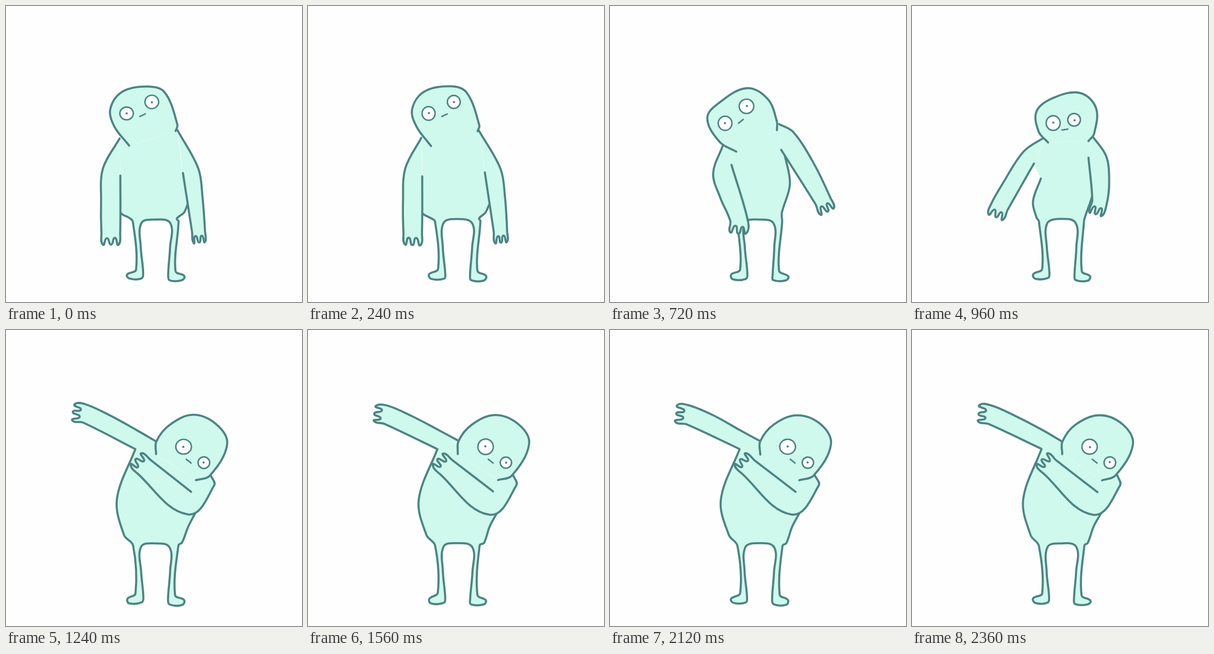
An HTML page with a canvas that plays this animation: 540x540 px, repeating every 2440 ms.

```html
<!DOCTYPE html>
<html lang="en">
<head>
<meta charset="utf-8">
<title>Dab</title>
<style>
html, body { margin: 0; width: 100%; height: 100%; overflow: hidden; background: #fefefe; }
canvas { display: block; width: 100vw; height: 100vh; }
</style>
</head>
<body>
<canvas id="stage" width="540" height="540"></canvas>
<script>
const ctx = document.getElementById('stage').getContext('2d');
const LOOP = 2440, INK = '#4d8482', SKIN = '#cff9ed', PAPER = '#fefefe';

// Arms: neck, shoulder, elbow, wrist centre, armpit, then hand angle and half width.
// Eyes: x, y, radius of each. Everything else is a list of points.
const rest = {
  head: [225,255, 198,220, 190,188, 212,156, 258,147, 289,157, 313,217, 310,228],
  flankL: [207,376, 213,381, 223,386],
  flankR: [312,387, 324,377, 331,363],
  armL: [207,241, 177,297, 173,355, 191,415, 209,310, 90, 16.5],
  armR: [312,227, 351,297, 359,350, 351,411, 322,304, 87, 12],
  eyes: [220,196,12, 266,175,12]
};
const windUp = {
  head: [231,265, 201,249, 178,204, 200,176, 250,150, 288,170, 305,210, 304,227],
  flankL: [235,385, 235,390, 234,395],
  flankR: [314,378, 329,325, 318,270],
  armL: [206,254, 188,305, 201,350, 236,394, 221,290, 95, 16.5],
  armR: [309,216, 335,229, 371,286, 388,356, 312,262, 65, 15],
  eyes: [210,214,12.5, 249,183,13]
};
const peakArm = [309,214, 335,217, 400,271, 430,308, 312,257, 45, 15];
const swing = {
  armL: [246,238, 205,265, 165,325, 160,366, 222,288, 110, 16],
  armR: [328,236, 355,275, 360,325, 342,360, 322,276, 110, 14]
};
const dab = {
  head: [274,227, 274,203, 298,173, 341,155, 384,172, 403,208, 372,266, 346,274],
  flankL: [237,217, 202,309, 216,374],
  flankR: [321,388, 332,358, 346,333],
  armL: [274,203, 238,183, 190,157, 142,155, 236,217, 187, 17],
  armR: [374,265, 380,283, 331,337, 252,250, 338,295, 224, 17],
  eyes: [324,213,14, 361,242,10.5]
};
const keys = [
  [0, rest], [560, rest], [720, windUp], [800, { ...windUp, armR: peakArm }],
  [960, swing], [1160, dab], [LOOP, dab]
];

const lerp = (a, b, k) => a + (b - a) * k;

function sample(name, t) {
  const track = keys.filter(([, pose]) => name in pose);
  const i = track.findIndex(([time]) => time > t);
  const [t0, a] = track[i - 1], [t1, b] = track[i];
  const k = (t - t0) / (t1 - t0), eased = k * k * (3 - 2 * k);
  return a[name].map((v, j) => lerp(v, b[name][j], eased));
}

let seed = 1;
function jitter(size) {
  seed = (seed * 16807) % 2147483647;
  return (seed / 2147483647 * 2 - 1) * size;
}

const points = list => Array.from({ length: list.length >> 1 }, (_, i) => [list[2 * i], list[2 * i + 1]]);

// Outline from the neck, down the outside, round three fingers and up to the armpit.
function armOutline(arm, side) {
  const [neck, shoulder, elbow, wrist, armpit] = points(arm);
  const [angle, half] = arm.slice(-2);
  const ux = Math.cos(angle * Math.PI / 180), uy = Math.sin(angle * Math.PI / 180);
  const at = (along, across) => [
    wrist[0] + ux * along - side * uy * across * half,
    wrist[1] + uy * along + side * ux * across * half
  ];
  const fingers = [];
  for (let i = 0; i < 5; i++) fingers.push(at(i % 2 ? 8 : 21, 0.84 - i * 0.42));
  return [neck, shoulder, elbow, at(0, 1), ...fingers, at(0, -1), armpit];
}

// The right leg mirrors the left one, a little lower at the foot.
function legOutlines() {
  const left = points([232,393, 237,480, 221,490, 225,498, 248,497, 250,488, 246,440, 247,396]);
  const right = left.map(([x, y]) => [546 - x, y > 470 ? y + 3 : y]).reverse();
  return [...left, [270, 389], ...right];
}

function rotate(pts, [cx, cy], degrees) {
  const c = Math.cos(degrees * Math.PI / 180), s = Math.sin(degrees * Math.PI / 180);
  return pts.map(([x, y]) => [cx + (x - cx) * c - (y - cy) * s, cy + (x - cx) * s + (y - cy) * c]);
}

// Smooth open curve through the points.
function curve(pts) {
  const tangent = i => {
    const a = pts[Math.max(i - 1, 0)], b = pts[Math.min(i + 1, pts.length - 1)];
    const dx = b[0] - a[0], dy = b[1] - a[1], d = Math.hypot(dx, dy) || 1;
    return [dx / d, dy / d];
  };
  ctx.beginPath();
  ctx.moveTo(...pts[0]);
  for (let i = 1; i < pts.length; i++) {
    const p = pts[i - 1], q = pts[i], u = tangent(i - 1), v = tangent(i);
    const h = Math.hypot(q[0] - p[0], q[1] - p[1]) * 0.34;
    ctx.bezierCurveTo(p[0] + u[0] * h, p[1] + u[1] * h, q[0] - v[0] * h, q[1] - v[1] * h, q[0], q[1]);
  }
}

function shape(outline, join = []) {
  const pts = outline.map(([x, y]) => [x + jitter(0.8), y + jitter(0.8)]);
  curve(pts);
  for (const p of join) ctx.lineTo(...p);
  ctx.fillStyle = SKIN;
  ctx.fill();
  curve(pts);
  ctx.stroke();
}

function eye(x, y, r) {
  ctx.beginPath();
  ctx.ellipse(x, y, r + jitter(0.5), r + jitter(0.5), 0, 0, Math.PI * 2);
  ctx.fillStyle = PAPER;
  ctx.fill();
  ctx.stroke();
  ctx.beginPath();
  ctx.arc(x + jitter(1), y + jitter(1), 2, 0, Math.PI * 2);
  ctx.fillStyle = INK;
  ctx.fill();
}

// The mouth lies below the eyes, parallel to the line between them.
function drawFace([x1, y1, r1, x2, y2, r2]) {
  ctx.lineWidth = 2.7;
  eye(x1, y1, r1);
  eye(x2, y2, r2);
  const d = Math.hypot(x2 - x1, y2 - y1), ux = (x2 - x1) / d, uy = (y2 - y1) / d;
  const x = (x1 + x2) / 2 - uy * 15, y = (y1 + y2) / 2 + ux * 15;
  ctx.beginPath();
  ctx.moveTo(x - ux * 5.5, y - uy * 5.5);
  ctx.lineTo(x + ux * 5.5, y + uy * 5.5);
  ctx.stroke();
}

function draw(t) {
  seed = t + 1;
  const part = name => points(sample(name, t));
  const head = part('head');
  const armR = armOutline(sample('armR', t), -1);
  const armL = armOutline(sample('armL', t), 1);
  // The raised arm overshoots once when the dab lands.
  const lift = 14 * Math.exp(-(((t - 1320) / 50) ** 2));
  const raised = [armL[0], ...rotate(armL.slice(1, -1), [258, 212], lift), armL.at(-1)];
  const body = [...part('flankL'), ...legOutlines(), ...part('flankR')];

  ctx.fillStyle = PAPER;
  ctx.fillRect(0, 0, 540, 540);
  ctx.strokeStyle = INK;
  ctx.lineCap = ctx.lineJoin = 'round';
  ctx.lineWidth = 3.8;
  shape(body, [armR.at(-1), armR[0], head.at(-1), head[0], armL[0], armL.at(-1)]);
  shape(raised);
  shape(armR);
  shape(head);
  drawFace(sample('eyes', t));
}

// Drawings are held for 80 ms; the one before the dab is cut short.
function hold(t) {
  const from = t < 1160 ? 0 : 1160;
  return from + Math.floor((t - from) / 80) * 80;
}

const start = performance.now();
function tick() {
  draw(hold((performance.now() - start) % LOOP));
  requestAnimationFrame(tick);
}
tick();
</script>
</body>
</html>
```
